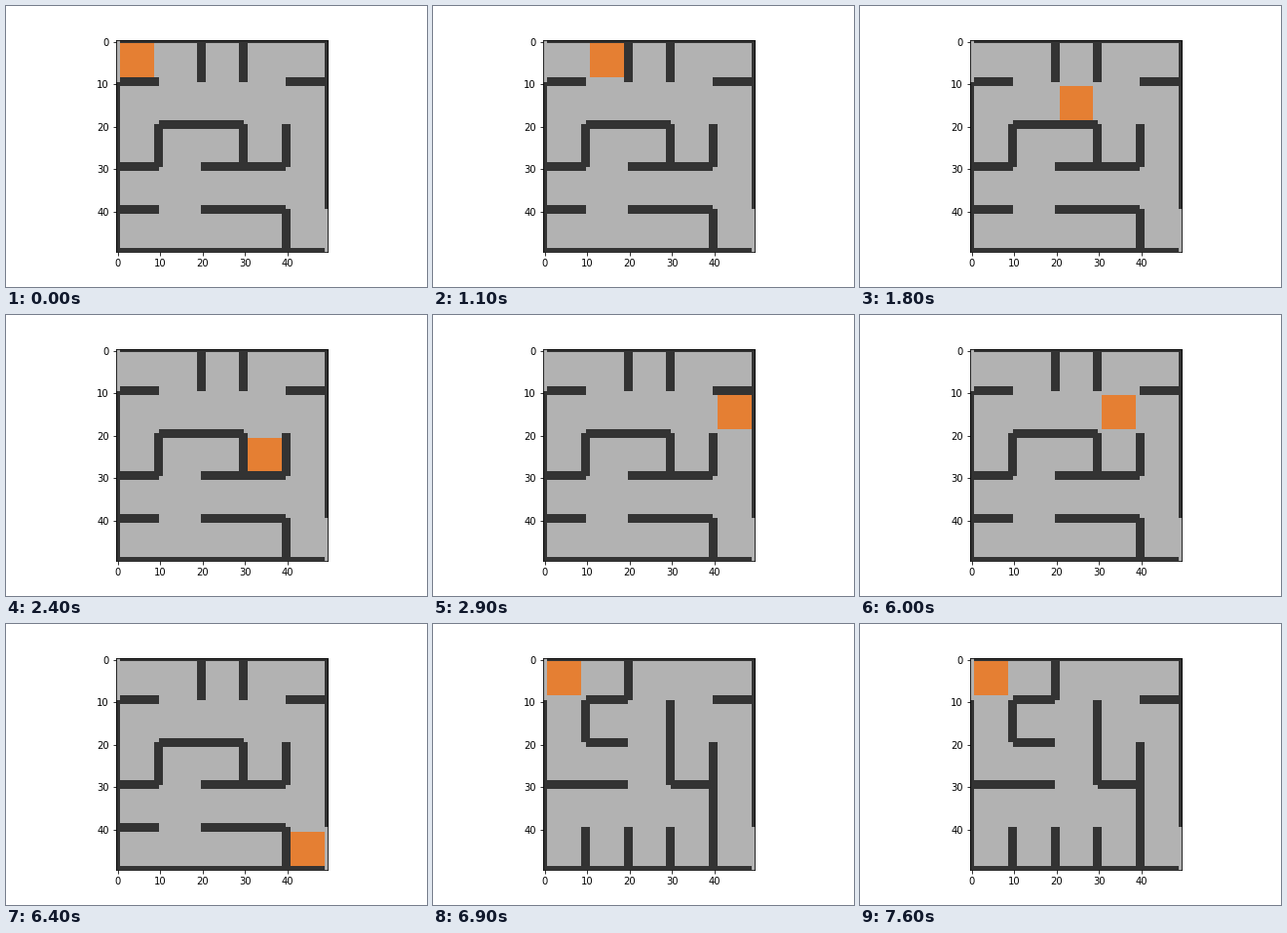
Animation, 432 px wide and 288 px high, one loop 8 s. Source, as a matplotlib script:

```python
import matplotlib.pyplot as plt
import numpy as np
from matplotlib.animation import FuncAnimation

SIZE, CELL = 50, 10
FLOOR, WALL, AGENT = (0.7, 0.7, 0.7), (0.2, 0.2, 0.2), (0.9, 0.5, 0.2)
STEP_MS, FRAMES = 100, 80

# Walls in cell units: (line, start, end)
MAZES = [
    {
        "across": [(1, 0, 1), (1, 4, 5), (2, 1, 3), (3, 0, 1),
                   (3, 2, 4), (4, 0, 1), (4, 2, 4)],
        "down": [(2, 0, 1), (3, 0, 1), (1, 2, 3), (3, 2, 3),
                 (4, 2, 3), (4, 4, 5)],
    },
    {
        "across": [(1, 1, 2), (1, 4, 5), (2, 1, 2), (3, 0, 2), (3, 3, 4)],
        "down": [(2, 0, 1), (1, 1, 2), (3, 1, 3), (4, 2, 5),
                 (1, 4, 5), (2, 4, 5), (3, 4, 5)],
    },
]

# (first step, maze, row, column)
MOVES = [
    (0, 0, 0, 0), (11, 0, 0, 1), (13, 0, 1, 1),
    (18, 0, 1, 2), (19, 0, 1, 1), (20, 0, 1, 2),
    (23, 0, 1, 3), (24, 0, 2, 3),
    (28, 0, 1, 3), (29, 0, 1, 4), (30, 0, 1, 3), (31, 0, 2, 3),
    (60, 0, 1, 3), (61, 0, 1, 4), (62, 0, 2, 4), (63, 0, 3, 4),
    (64, 0, 4, 4), (65, 1, 0, 0),
    (68, 1, 0, 1), (69, 1, 0, 0), (75, 1, 0, 1), (76, 1, 0, 0),
]


def build(maze):
    grid = np.full((SIZE, SIZE, 3), FLOOR)
    grid[[0, -1], :] = WALL
    grid[:, [0, -1]] = WALL
    # Transposing swaps rows and columns, so one loop serves both directions
    for walls, view in ((maze["across"], grid),
                        (maze["down"], grid.transpose(1, 0, 2))):
        for line, start, end in walls:
            at = line * CELL
            view[at - 1:at + 1, start * CELL:end * CELL] = WALL
    grid[:CELL, 0] = FLOOR      # entrance
    grid[-CELL:, -1] = FLOOR    # exit
    return grid


GRIDS = [build(maze) for maze in MAZES]


def state(step):
    _, maze, row, col = [move for move in MOVES if move[0] <= step][-1]
    grid = GRIDS[maze].copy()
    y, x = row * CELL, col * CELL
    grid[y + 1:y + CELL - 1, x + 1:x + CELL - 1] = AGENT
    return grid


plt.rcParams["font.family"] = "DejaVu Sans"
fig, ax = plt.subplots(figsize=(6, 4), dpi=72)
fig.subplots_adjust(left=0.125, right=0.9, bottom=0.125, top=0.88)
image = ax.imshow(state(0), interpolation="nearest")
ax.set_xticks(range(0, SIZE, CELL))
ax.set_yticks(range(0, SIZE, CELL))


def update(step):
    image.set_data(state(step))
    return [image]


anim = FuncAnimation(fig, update, frames=FRAMES, interval=STEP_MS,
                     repeat=True, repeat_delay=0)
plt.show()
```
